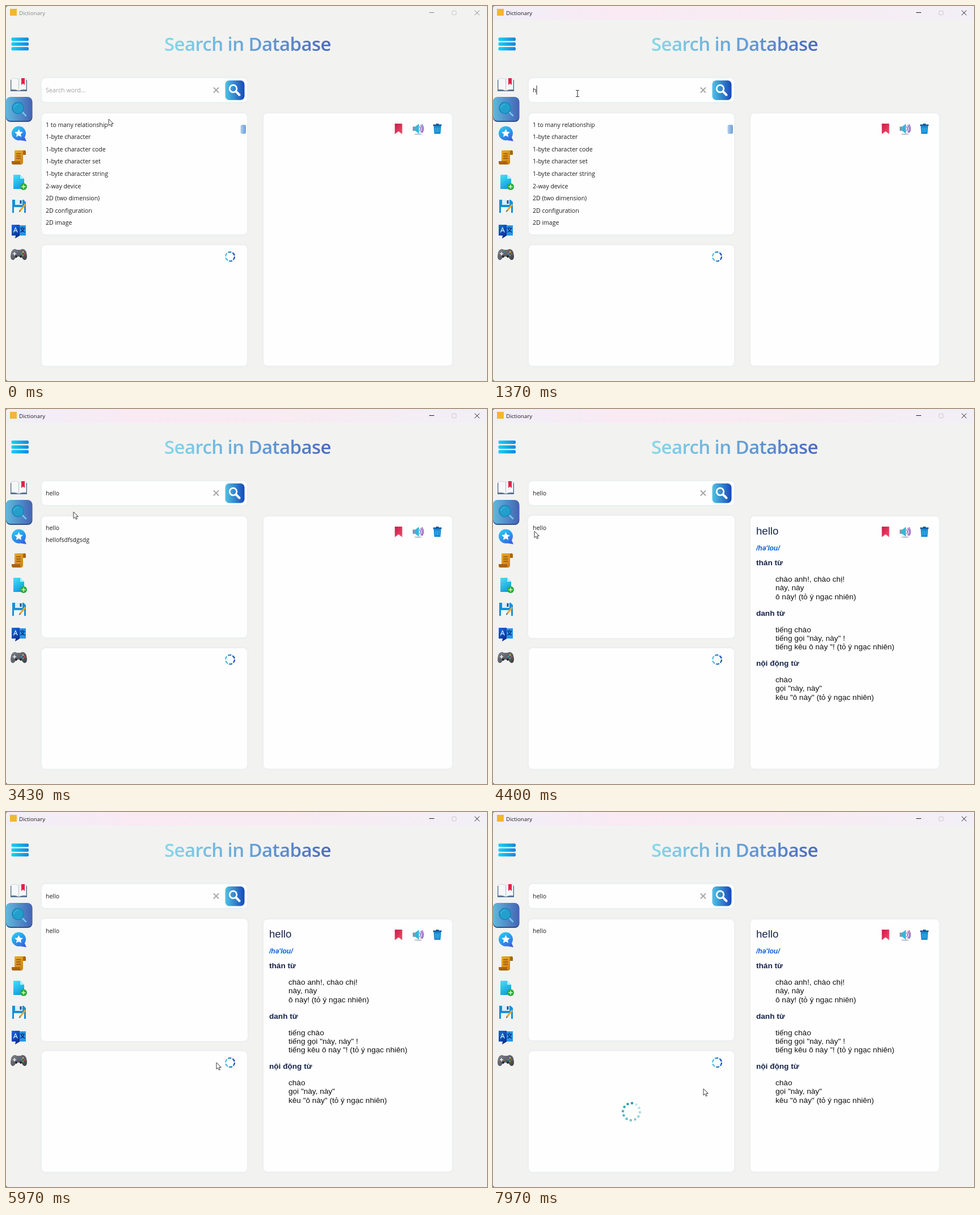
An HTML page for the animation above (8 s loop, 848 px wide and 660 px high).

```html
<!DOCTYPE html>
<html lang="en">
<head>
<meta charset="utf-8">
<title>Dictionary</title>
<style>
  html, body { margin: 0; width: 100%; height: 100%; overflow: hidden; background: #f2f2f1; }
  svg { display: block; width: 848px; height: 660px; }
  text { font-family: "Open Sans", "Noto Sans", sans-serif; font-size: 10.5px; font-weight: 500; fill: #1c1c1c; white-space: pre; }
  .title { font-size: 33px; font-weight: 600; letter-spacing: -.6px; fill: url(#titleFill); }
  .caption { font-size: 9.7px; font-weight: 400; }
  .prompt { font-size: 10.7px; font-weight: 400; fill: #a3a3a3; }
  .panel { fill: #fdfefd; filter: drop-shadow(0 0 2px #e2eaef); }
  #meaning text { font-family: "Liberation Sans", Arial, sans-serif; font-size: 13.6px; font-weight: 400; fill: #111; }
  #meaning .word { font-size: 18.6px; fill: #18234a; }
  #meaning .sound { font-size: 12px; font-weight: 700; font-style: italic; fill: #0c62d6; }
  #meaning .kind { font-weight: 700; fill: #16224b; }
  .line { fill: none; stroke-linecap: round; stroke-linejoin: round; }
</style>
</head>
<body>
<svg viewBox="0 0 848 660">
  <defs>
    <linearGradient id="titleFill"><stop stop-color="#85dae8"/><stop offset=".5" stop-color="#68a5d9"/><stop offset="1" stop-color="#4b6abf"/></linearGradient>
    <linearGradient id="barFill"><stop stop-color="#f0eff8"/><stop offset=".25" stop-color="#f9eaf4"/><stop offset=".6" stop-color="#f8ebf2"/><stop offset="1" stop-color="#f2eff7"/></linearGradient>
    <linearGradient id="menuFill"><stop stop-color="#16d2f4"/><stop offset="1" stop-color="#1685dc"/></linearGradient>
    <linearGradient id="pickFill"><stop stop-color="#60b9dc"/><stop offset="1" stop-color="#4464b6"/></linearGradient>
    <linearGradient id="goFill"><stop stop-color="#50c3e5"/><stop offset="1" stop-color="#1748b8"/></linearGradient>
    <linearGradient id="thumbFill"><stop stop-color="#b0d0ef"/><stop offset="1" stop-color="#709dd5"/></linearGradient>
    <linearGradient id="skyFill" x2=".6" y2="1"><stop stop-color="#24d6f8"/><stop offset="1" stop-color="#336fe4"/></linearGradient>
    <linearGradient id="cyanFill" x2=".5" y2="1"><stop stop-color="#45e1f8"/><stop offset="1" stop-color="#149ddd"/></linearGradient>
    <linearGradient id="goldFill" y2="1"><stop stop-color="#efad2f"/><stop offset="1" stop-color="#c77b12"/></linearGradient>
    <linearGradient id="navyFill" x2=".6" y2="1"><stop stop-color="#176bdb"/><stop offset="1" stop-color="#0d2e93"/></linearGradient>
    <linearGradient id="redFill" y2="1"><stop stop-color="#c91c4b"/><stop offset="1" stop-color="#f34a68"/></linearGradient>
    <linearGradient id="padFill" y2="1"><stop stop-color="#81858b"/><stop offset="1" stop-color="#3b3d43"/></linearGradient>
  </defs>

  <rect width="848" height="660" fill="#5c5c5e"/>
  <rect width="860" height="660" rx="4" fill="#f2f2f1"/>
  <path id="bar" d="M0 24V4Q0 0 4 0H848V24Z" fill="url(#barFill)"/>
  <rect x="7" y="5" width="12" height="12" fill="#f2b632"/>
  <g id="chrome">
    <text class="caption" x="23" y="15.5" style="fill:inherit">Dictionary</text>
    <path class="line" d="M746.5 11.5h8M826.5 8l8 8m0-8l-8 8" stroke="currentColor"/>
  </g>
  <rect x="786.5" y="8.5" width="7" height="7" rx="1" fill="none" stroke="#c9c6ca"/>
  <text class="title" x="279" y="79">Search in Database</text>

  <g fill="url(#menuFill)">
    <rect x="9.5" y="55.5" width="30.5" height="6" rx="2"/>
    <rect x="9.5" y="64" width="30.5" height="6" rx="2"/>
    <rect x="9.5" y="72.3" width="30.5" height="6" rx="2"/>
  </g>

  <!-- sidebar -->
  <g>
    <path d="M8 130h29v20H8Z" fill="#526d8d"/>
    <path d="M9.5 128q7-2 13 1 6-3 13-1v19q-7-1-13 2-6-3-13-2Z" fill="#f6f7f8" stroke="#c5ced8" stroke-width=".7"/>
    <path d="M22.5 129v19" stroke="#b5bfca"/>
    <path d="M27 127h6v12l-3-2.5-3 2.5Z" fill="#df2347"/>
  </g>
  <rect x="0" y="161" width="46.5" height="43" rx="8" fill="#324f86"/>
  <rect x="0" y="160" width="46" height="42" rx="8" fill="url(#pickFill)"/>
  <path class="line" d="M28 186l7 7" stroke="#75c9ee" stroke-width="2.5"/>
  <circle cx="21" cy="179.500" r="10" fill="#239fcc" stroke="#1b83b9" stroke-width="1.500"/>
  <path class="line" d="M14 179a7 7 0 0 1 7-6" stroke="#58c5e3"/>
  <g>
    <path d="M32 229l4 9-12-2Z" fill="#3b62df"/>
    <circle cx="22.500" cy="224" r="12.500" fill="url(#skyFill)"/>
    <path d="M22.500 216.500l2.200 4.800 5.200.6-3.900 3.500 1.100 5.100-4.600-2.600-4.600 2.600 1.100-5.100-3.900-3.500 5.200-.6Z" fill="#fff"/>
  </g>
  <g>
    <path d="M16 254h16q3 0 3 3v5h-5v13q0 4-4 4H13q-3 0-3-4v-2h5v-16q0-3 1-3Z" fill="url(#goldFill)"/>
    <path d="M30 262v-5q0-3 3-3 2 0 2 4v4ZM10 273h15v3q0 3 2 3H13q-3 0-3-4Z" fill="#a9640d"/>
    <path d="M18 260h8m-8 4h8m-8 4h8" stroke="#8c520c" stroke-width="1.300"/>
  </g>
  <g>
    <path d="M13 297h12l7 7v18H13Z" fill="url(#cyanFill)"/>
    <path d="M25 297l7 7h-7Z" fill="#a6f0fc"/>
    <circle cx="31" cy="318" r="6" fill="#29ad35"/>
    <path d="M27.500 318h7m-3.500-3.500v7" stroke="#d9f7cf" stroke-width="1.500"/>
  </g>
  <g>
    <path d="M11 341h20l4 4v19H11Z" fill="#178fd5"/>
    <path d="M16 341h13v9H16Z" fill="#dceef8"/><path d="M24.500 342h3v6h-3Z" fill="#174f91"/>
    <path d="M14 354h18v10H14Z" fill="#eef6fa"/>
    <path d="M25 360l9-11" stroke="#f4a328" stroke-width="3"/><path d="M23 363l1-4 2 2Z" fill="#634022"/>
  </g>
  <g>
    <path d="M22 386h13v18H22Z" fill="#2695e5"/>
    <path d="M10 385h14v19l-8 5 1-5h-7Z" fill="url(#navyFill)"/>
    <path d="M21 404h3l-8 5Z" fill="#102a7f"/>
    <path class="line" d="M13.500 398l3.300-8 3.300 8m-5.300-2.500h4" stroke="#bfeaff" stroke-width="1.300"/>
    <path class="line" d="M25 391h8m-4-2v2m3 0q-1.500 5-6.500 7m1-7q1.500 5 6.500 7" stroke="#0b246f" stroke-width="1.200"/>
  </g>
  <g>
    <path d="M14 428q3-1 5 1h7q2-2 5-1 5 1 6 12 0 7-4 7-3 0-6-6h-9q-3 6-6 6-4 0-4-7 1-11 6-12Z" fill="url(#padFill)"/>
    <path d="M12 436h6m-3-3v6" stroke="#e7e9eb" stroke-width="1.700"/>
    <circle cx="30" cy="433" r="1.300" fill="#f0c52d"/><circle cx="33" cy="436" r="1.300" fill="#e43e43"/>
    <circle cx="27" cy="436" r="1.300" fill="#3c9ce8"/><circle cx="30" cy="439" r="1.300" fill="#48b94f"/>
    <circle cx="18" cy="441" r="2" fill="#24262a"/><circle cx="26" cy="441" r="2" fill="#24262a"/>
  </g>

  <!-- panels -->
  <rect class="panel" x="63" y="127" width="362" height="42" rx="7"/>
  <rect class="panel" id="listPanel" rx="7"/>
  <rect class="panel" x="63" y="421" width="362" height="212.500" rx="7"/>
  <rect class="panel" x="454" y="189" width="332.500" height="444" rx="7"/>

  <text id="query" x="70" y="152"></text>
  <path id="caret" d="M0 140v16" stroke="#222"/>
  <path class="line" d="M366.500 144l8 8m0-8l-8 8" stroke="#a8a8a8" stroke-width="2"/>
  <rect x="386.500" y="131" width="34" height="34.500" rx="7" fill="url(#goFill)"/>
  <circle cx="400.500" cy="145.500" r="6.300" fill="none" stroke="#fff" stroke-width="2.800"/>
  <path class="line" d="M405.500 150.500l6 6" stroke="#fff" stroke-width="4"/>

  <g id="words"></g>
  <rect id="thumb" x="413.500" y="209" width="9.500" height="16" rx="3" fill="url(#thumbFill)"/>

  <path d="M685.500 207h13v18.500l-6.500-5-6.500 5Z" fill="url(#redFill)"/>
  <g>
    <path d="M717 212.500h4l7-5v17l-7-5h-4Z" fill="#34b8d8"/><path d="M717 212.500h4v7h-4Z" fill="#8797ab"/>
    <path class="line" d="M729.500 212.500q2.500 3.500 0 7m2-9.500q4.500 6 0 12m2-13.500q5 7.500 0 14" stroke="#7b3fb0" stroke-width="1.300"/>
    <ellipse cx="726.500" cy="225.500" rx="7" ry=".9" fill="#adb5c0"/>
  </g>
  <g>
    <path d="M754 211h13l-1 14h-11Z" fill="#168bd1"/>
    <path d="M753 208.500h15v2.500h-15Z" fill="#175b9f"/><path d="M758 207h5v2h-5Z" fill="#175b9f"/>
    <path d="M757.500 214l.3 8m2.700-8v8m3-8l-.3 8" stroke="#50bdec"/>
  </g>
  <circle cx="395" cy="441" r="8" fill="none" stroke="url(#goFill)" stroke-width="2.300" stroke-dasharray="6.200 2.180"/>

  <g id="meaning"></g>
  <g id="spinner"></g>
  <g id="pointer">
    <path id="arrow" d="M0 0v11.500l2.600-2.400 1.900 4.100 2-.9-1.900-4h3.700Z" fill="#fff" stroke="#25252b" stroke-width=".9"/>
    <path id="beam" class="line" d="M-2.500-5.500h2l.5.500.500-.500h2M0-5v10M-2.500 5.500h2l.5-.500.500.500h2" stroke="#222"/>
  </g>
</svg>
<script>
const LOOP = 8000;
const FOCUS = 560, FILTER = 1570, SELECT = 4200, REFRESH = 6300;
const LAST_KEY = 1900, SPIN = 1610, DOTS = 12;

const allWords = ["1 to many relationship", "1-byte character", "1-byte character code",
  "1-byte character set", "1-byte character string", "2-way device",
  "2D (two dimension)", "2D configuration", "2D image"];
const matches = ["hello", "hellofsdfsdgsdg"];
const typing = [[0, ""], [1370, "h"], [1650, "he"], [1740, "hel"], [1820, "hell"], [LAST_KEY, "hello"]];
const senses = [
  ["thán từ", "chào anh!, chào chị!", "này, này", "ô này! (tỏ ý ngạc nhiên)"],
  ["danh từ", "tiếng chào", "tiếng gọi \"này, này\" !", "tiếng kêu ô này \"! (tỏ ý ngạc nhiên)"],
  ["nội động từ", "chào", "gọi \"này, này\"", "kêu \"ô này\" (tỏ ý ngạc nhiên)"]
];
// time, x, y
const path = [[0, 181, 199], [150, 181, 199], [540, 149, 154], [2700, 149, 154], [3430, 119, 181],
  [4050, 73, 215], [4700, 73, 215], [5970, 371, 441], [6200, 393, 441], [6400, 393, 441],
  [6900, 368, 489], [7400, 368, 489], [7970, 371, 487]];

const $ = id => document.getElementById(id);
function add(parent, tag, attrs, content = "") {
  const node = document.createElementNS("http://www.w3.org/2000/svg", tag);
  for (const key in attrs) node.setAttribute(key, attrs[key]);
  node.textContent = content;
  return parent.appendChild(node);
}
const show = (id, on) => { $(id).style.display = on ? "" : "none"; };
const setText = (node, value) => { if (node.textContent !== value) node.textContent = value; };

const rows = allWords.map((_, i) => add($("words"), "text", { x: 70, y: 212.5 + i * 21.6 }));

add($("meaning"), "text", { class: "word", x: 464, y: 221 }, "hello");
add($("meaning"), "text", { class: "sound", x: 464, y: 249 }, "/hə'lou/");
senses.forEach(([kind, ...lines], i) => {
  const y = 275 + i * 88.5;
  add($("meaning"), "text", { class: "kind", x: 464, y }, kind);
  lines.forEach((line, j) => add($("meaning"), "text", { x: 498, y: y + 29 + j * 15.4 }, line));
});

const dots = Array.from({ length: DOTS }, (_, i) => {
  const angle = (i / DOTS) * 2 * Math.PI - 1.5;
  return add($("spinner"), "circle", {
    cx: 244 + 15 * Math.cos(angle), cy: 527.5 + 15 * Math.sin(angle), r: 2.3, fill: "#199bb2"
  });
});

function pointerAt(t) {
  const next = path.findIndex(p => p[0] > t);
  if (next < 0) return path[path.length - 1].slice(1);
  const [t0, x0, y0] = path[next - 1], [t1, x1, y1] = path[next];
  const u = (t - t0) / (t1 - t0), k = u * u * (3 - 2 * u);
  return [x0 + (x1 - x0) * k, y0 + (y1 - y0) * k];
}

function caretOn(t) {
  if (t < FOCUS || t >= SELECT) return false;
  const since = t >= LAST_KEY ? t - LAST_KEY : t >= 1370 ? 0 : t - FOCUS;
  return since % 1000 < 500;
}

function draw(t) {
  const focused = t >= FOCUS;
  show("bar", focused);
  $("chrome").style.color = $("chrome").style.fill = focused ? "#1b1b1b" : "#858585";

  const typed = typing.filter(step => step[0] <= t).pop()[1];
  setText($("query"), typed || "Search word...");
  $("query").setAttribute("class", typed ? "" : "prompt");
  const caretX = typed ? 70.5 + $("query").getComputedTextLength() : 70.5;
  $("caret").setAttribute("transform", `translate(${caretX})`);
  show("caret", caretOn(t));

  const words = t < FILTER ? allWords : t < SELECT ? matches : matches.slice(0, 1);
  rows.forEach((row, i) => setText(row, words[i] || ""));
  show("thumb", t < FILTER);

  const grow = t >= SELECT && t < REFRESH ? 1 : 0;
  const box = { x: 63 - grow, y: 189 - grow, width: 362 + 2 * grow, height: 213 + 2 * grow };
  for (const key in box) $("listPanel").setAttribute(key, box[key]);

  show("meaning", t >= SELECT);
  show("spinner", t >= REFRESH);
  const head = Math.floor((t - 7970) / SPIN * DOTS + .1);
  dots.forEach((dot, i) => {
    const age = (((head - i) % DOTS) + DOTS) % DOTS;
    dot.setAttribute("opacity", 1 - age * .07);
  });

  const [x, y] = pointerAt(t);
  const inField = x > 63 && x < 380 && y > 127 && y < 169;
  $("pointer").setAttribute("transform", `translate(${x} ${y})`);
  show("arrow", !inField);
  show("beam", inField);
}

const start = performance.now();
function tick() {
  draw((performance.now() - start) % LOOP);
  requestAnimationFrame(tick);
}
tick();
</script>
</body>
</html>
```
